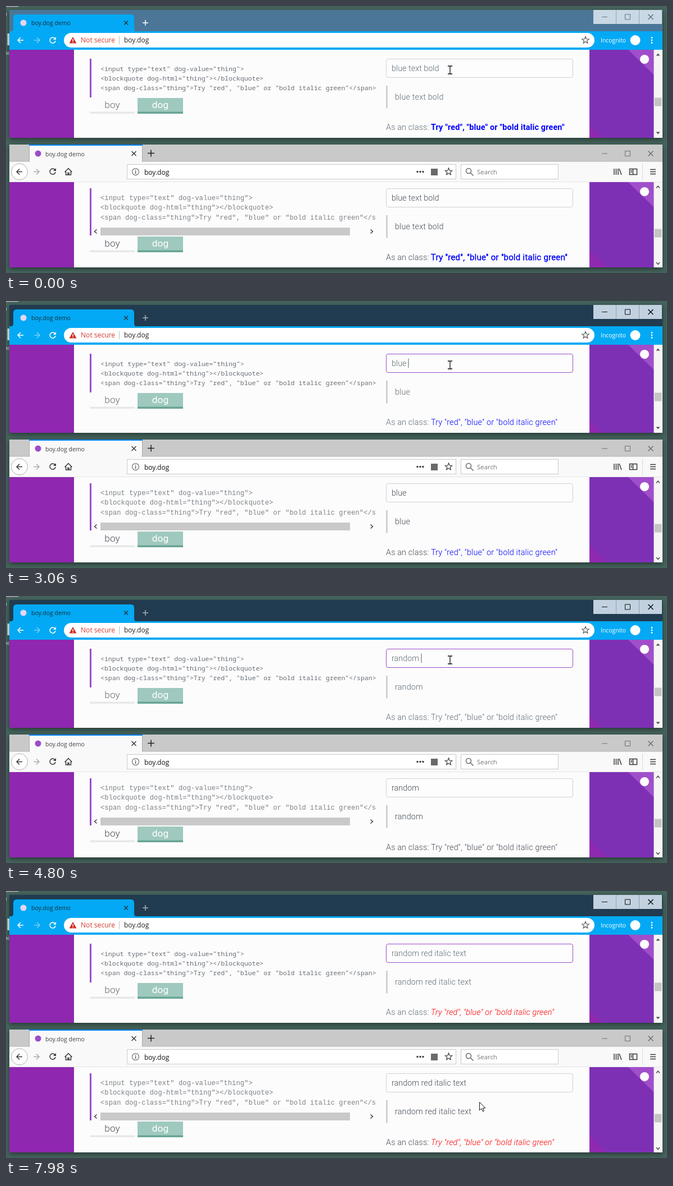
An HTML page for the animation above (8000 ms loop, 1176x476 px).

```html
<!DOCTYPE html>
<html lang="en">
<head>
<meta charset="utf-8">
<title>Two-window typing demo</title>
<style>
  html, body { margin: 0; width: 100%; height: 100%; overflow: hidden; background: #45645c; }
  svg { display: block; width: 1176px; height: 476px; }
  text { white-space: pre; }
  .ui { font-family: "Open Sans", "Noto Sans", sans-serif; }
  .body { font: 300 14.4px Roboto, sans-serif; fill: #606c76; }
  .spaced { letter-spacing: .144px; }
  .code { font: 11.52px "Noto Sans Mono", monospace; fill: #697077; }
  .tab { font: 300 17.3px Roboto, sans-serif; fill: #606c76; text-anchor: middle; }
  .ff .body, .ff .tab { fill: #454e57; }
  .ff .code { font: 12px "Liberation Mono", monospace; letter-spacing: .115px; fill: #7c8288; }
  .tab.on { fill: #fff; font-weight: 400; }
  .ff .tab.on { fill: #fff; }
  .red { fill: #f00 !important; }
  .blue { fill: #00f !important; }
  .green { fill: #080 !important; }
  .bold { font-weight: 700; }
  .ff .bold { font-weight: 300; stroke: currentColor; stroke: #00f; stroke-width: .75px; letter-spacing: .59px; }
  .italic { font-style: italic; }
  .line { fill: none; stroke-width: 1.5; }
  .frame { filter: drop-shadow(0 3px 4px rgba(0, 0, 0, .45)); }
  .chrome .field { stroke: #d1d1d1; }
  .chrome .field.focus { stroke: #9b4dca; }
</style>
</head>
<body>
<svg id="stage" viewBox="0 0 1176 476" xmlns="http://www.w3.org/2000/svg"></svg>
<script>
const LOOP = 8000;

// [time, input text]; the second window shows the entry before the current one
const keys = [
  [0, 'blue text bold'], [680, 'blue text bold'],
  [1820, 'blue text bol'], [1960, 'blue text bo'], [2090, 'blue text b'],
  [2230, 'blue text '], [2370, 'blue text '],
  [2640, 'blue tex'], [2780, 'blue t'], [2920, 'blue '], [3060, 'blue '],
  [3210, 'blue'], [3350, 'blu'], [3490, 'bl'], [3630, 'b'], [3750, ''], [3870, ''],
  [4140, 'r'], [4270, 'ra'], [4400, 'rand'], [4530, 'rando'], [4670, 'random'], [4800, 'random '],
  [5050, 'random r'], [5200, 'random re'], [5320, 'random red'], [5440, 'random red'],
  [5710, 'random red i'], [5860, 'random red it'], [6020, 'random red ita'],
  [6170, 'random red ital'], [6330, 'random red itali'], [6490, 'random red italic'],
  [6650, 'random red italic t'], [6770, 'random red italic te'], [6890, 'random red italic tex'],
  [7170, 'random red italic text'], [7300, 'random red italic text']
];

// [time, x, y, shape]
const moves = [
  [0, 790, 114, 'beam'], [7440, 794, 140, 'arrow'], [7570, 826, 300, 'arrow'],
  [7700, 877, 437, 'arrow'], [7850, 860, 405, 'arrow'], [7980, 842, 376, 'arrow']
];

const rect = (x, y, w, h, fill, more = '') =>
  `<rect x="${x}" y="${y}" width="${w}" height="${h}" fill="${fill}" ${more}/>`;
const path = (d, color, more = '') => `<path class="line" d="${d}" stroke="${color}" ${more}/>`;
const shape = (d, fill) => `<path d="${d}" fill="${fill}"/>`;
const dot = (x, y, r, fill) => `<circle cx="${x}" cy="${y}" r="${r}" fill="${fill}"/>`;
const escapeText = s => s.replace(/&/g, '&amp;').replace(/</g, '&lt;');
const label = (x, y, s, cls, more = '') =>
  `<text x="${x}" y="${y}" class="${cls}" ${more}>${escapeText(s)}</text>`;
const ui = (x, y, s, size, fill) => label(x, y, s, 'ui', `font-size="${size}" fill="${fill}"`);
const cross = (x, y, r, color) =>
  path(`M${x - r} ${y - r}l${2 * r} ${2 * r}m0 ${-2 * r}l${-2 * r} ${2 * r}`, color);
const plus = (x, y, r, color) => path(`M${x - r} ${y}h${2 * r}M${x} ${y - r}v${2 * r}`, color);
const arrow = (x, y, dir, color) =>
  path(`M${x - 5 * dir} ${y}h${10 * dir}m${-5 * dir} -5l${5 * dir} 5l${-5 * dir} 5`, color, 'stroke-width="2"');
const reload = (x, y, color) =>
  path(`M${x + 4} ${y - 3}a5 5 0 1 0 1 4`, color) + shape(`M${x + 6} ${y - 6}v5h-5z`, color);
const captions = (y, color) =>
  path(`M1060 ${y}h10M1101.5 ${y - 4.5}h9v9h-9z`, color, 'style="stroke-width:1"') + cross(1147, y, 4.5, color);

function star(x, y, color) {
  let d = '';
  for (let i = 0; i < 10; i++) {
    const r = i % 2 ? 2.8 : 6.5, a = i * Math.PI / 5;
    d += `${i ? 'L' : 'M'}${x + r * Math.sin(a)} ${y - r * Math.cos(a)}`;
  }
  return path(d + 'z', color, 'style="stroke-width:1.2"');
}

// Page body; each row of g holds the vertical places of one window
function page(id, g) {
  const { top, end, code, pre, tab, field, quote, note } = g;
  const lines = ['<input type="text" dog-value="thing">',
    '<blockquote dog-html="thing"></blockquote>',
    '<span dog-class="thing">Try "red", "blue" or "bold italic green"</span>'];
  return `<clipPath id="${id}Page"><rect x="6" y="${top}" width="1162" height="${end - top}"/></clipPath>
  <clipPath id="${id}Code"><rect x="149" y="${top}" width="${g.codeWidth}" height="100"/></clipPath>
  <g clip-path="url(#${id}Page)">` +
    rect(6, top, 115, end - top, '#8f27b0') +
    rect(121, top, 917, end - top, '#fcfcfc') +
    rect(1038, top, 115, end - top, '#7e30b5') +
    shape(`M1038 ${end - g.wedge}l${g.wedge} ${g.wedge}h-${g.wedge}z`, '#8f29b0') +
    shape(`M1107 ${top}h46v45z`, '#a04fcb') + dot(1136, top + 17, 8, '#fff') +
    rect(1152.5, top, 15.5, end - top, '#f5f5f5') +
    rect(1154, g.thumb, 12.5, 15, '#c4c4c4') + g.arrows +
    rect(149, pre, 3, g.preHeight, '#9b4dca') +
    `<g clip-path="url(#${id}Code)">` + lines.map((s, i) => label(168, code[i], s, 'code')).join('') + '</g>' +
    rect(149.5, tab + 24.5, 79.5, 3.5, '#e8e8e8') +
    rect(234, tab, 81, 25, '#9fc9be') + rect(234, tab + 24.5, 81, 3.5, '#69a596') +
    label(189, tab + 18, 'boy', 'tab') + label(274.5, tab + 18, 'dog', 'tab on') +
    `<rect id="${id}Field" class="field" x="676.5" y="${field + .5}" width="332" height="33" rx="3.5"
      fill="#fdfdfd" stroke="#d1d1d1"/>` +
    label(686, field + 21.5, '', 'body', `id="${id}Input"`) +
    `<rect id="${id}Bar" x="676" y="${quote}" width="3" height="40.5" fill="#d1d1d1"/>` +
    label(692, quote + 25, '', 'body spaced', `id="${id}Quote"`) +
    `<g id="${id}Below">` +
    label(676, note, 'As an class:', 'body spaced') +
    label(756, note, 'Try "red", "blue" or "bold italic green"', 'body spaced', `id="${id}Note"`) +
    label(522, note + 45, 'Getting started', 'body', 'style="font-size:17.3px"') + '</g></g>';
}

function topWindow() {
  const white = '#fff';
  return '<g class="chrome">' +
    rect(6, 7, 1162, 228, '#fcfcfc', 'class="frame"') +
    rect(6, 7, 1162, 39, '#4b7698', 'id="titleBar"') +
    shape('M7 46q6 0 6-6V21q0-6 6-6h203q6 0 6 6v19q0 6 6 6z', '#03a9f4') +
    rect(6, 45, 1162, 33, '#03a9f4') +
    dot(31, 30, 5.5, '#e6d5f1') + ui(45, 33.5, 'boy.dog demo', 10.5, '#12303f') +
    cross(213.5, 30, 3.5, '#20394a') +
    `<g id="newTab">${plus(248, 30, 5, white)}</g>` +
    `<g id="captions">${rect(1045, 7, 122, 25, '#c9d8e5')}` +
    path('M1085.5 7v25m41-25v25', '#91a7b8', 'style="stroke-width:1"') + '</g>' +
    `<g id="captionMarks">${captions(19.5, '#65737f')}</g>` +
    arrow(26, 61, -1, white) + `<g opacity=".45">${arrow(55, 61, 1, white)}</g>` + reload(83, 61, white) +
    rect(103, 48, 944, 26, white, 'rx="13"') +
    shape('M119 55l6.5 11.5h-13z', '#d02c22') + rect(118.3, 59, 1.5, 4, white) + rect(118.3, 64, 1.5, 1.3, white) +
    ui(133, 65.3, 'Not secure', 12.1, '#d33a30') + rect(201, 54, 1, 14, '#bbb') +
    ui(210, 65.3, 'boy.dog', 12, '#222') + star(1031, 61, '#555') +
    ui(1058, 64.7, 'Incognito', 10.4, white) + dot(1119.5, 61, 9, white) +
    [56.5, 61, 65.5].map(y => dot(1149, y, 1.4, white)).join('') +
    page('a', {
      top: 78, end: 235, code: [115.5, 132.5, 149.5], codeWidth: 515, pre: 94, preHeight: 69,
      tab: 164, field: 94, quote: 142, note: 221, wedge: 22, thumb: 163.5,
      arrows: shape('M1156.5 88.5l3.5-4 3.5 4z', '#505050') + shape('M1156.5 224.5l3.5 4 3.5-4z', '#505050')
    }) + rect(686, 102.5, 1, 16.5, '#59636c', 'id="caret"') + '</g>';
}

function lowerWindow() {
  const ink = '#3a3a3d', edge = '#cacacb';
  const chevron = (x, dir) => path(`M${x - 2 * dir} 398.5l${4 * dir} 3.5l${-4 * dir} 3.5`, '#404040');
  return '<g class="ff">' +
    rect(6, 247, 1162, 219, '#f9f9fa', 'class="frame"') +
    rect(6, 247, 1162, 30, '#c9c9c9') + rect(6, 276.5, 1162, 1, '#b4b4b4') +
    rect(41, 247, 202, 31, '#a9a9a9') + rect(42, 248, 200, 30, '#f9f9fa') + rect(41, 247, 202, 2, '#0a84ff') +
    dot(57, 263, 5.5, '#9b4dca') + ui(70, 267.5, 'boy.dog demo', 10.5, '#444') +
    cross(227.5, 263, 4, ink) + plus(258, 262.5, 6, '#222') + captions(263, '#707070') +
    `<circle cx="24" cy="295.5" r="14.5" fill="#fff" stroke="#b1b1b3"/>` + arrow(24, 295.5, -1, ink) +
    `<g opacity=".4">${arrow(54, 295.5, 1, ink)}</g>` + reload(83, 295, ink) +
    path('M104.5 296l6.5-6.5 6.5 6.5M106.5 295v6h9v-6M110 301v-3.5h2v3.5', ink) +
    rect(215.5, 282.5, 585, 26, '#fff', `stroke="${edge}"`) +
    path('M236.5 295.5a6 6 0 1 0-12 0a6 6 0 1 0 12 0', '#666', 'style="stroke-width:1.1"') +
    rect(229.8, 294.5, 1.5, 4.5, '#555') + rect(229.8, 291.8, 1.5, 1.5, '#555') +
    ui(246, 300.5, 'boy.dog', 12, '#111') +
    [732, 737, 742].map(x => dot(x, 295.5, 1.7, ink)).join('') +
    rect(756, 290, 12, 12, '#6a6a6d') + star(787.5, 295.5, ink) +
    rect(809.5, 282.5, 173, 26, '#fff', `stroke="${edge}"`) +
    path('M827.5 294a4.5 4.5 0 1 0-9 0a4.5 4.5 0 1 0 9 0M826.5 297.5l5 5', '#666') +
    ui(838, 300, 'Search', 11.4, '#777') +
    path('M1082 290v11m3.5-11v11m3.5-11v11m2-11l4 11', ink) +
    path('M1109.5 290.5h13v10h-13zM1115.5 290.5v10M1111.5 293.5h2.5m-2.5 2.5h2.5', ink) +
    rect(1132, 281, 1, 29, '#d7d7db') +
    path('M1146 291.5h10m-10 4h10m-10 4h10', ink) +
    rect(6, 313.5, 1162, 1, '#d2d2d3') +
    page('b', {
      top: 314, end: 466, code: [345.5, 362.5, 380.5], codeWidth: 509, pre: 325, preHeight: 84,
      tab: 411, field: 325, quote: 373, note: 453, wedge: 31, thumb: 397.5,
      arrows: path('M1157 324.5l3-3.5 3 3.5M1157 457l3 3.5 3-3.5', '#505050') +
        rect(168, 395, 444, 14, '#c9c9c9') + chevron(159.5, -1) + chevron(650.5, 1)
    }) + '</g>';
}

const desktop = shape('M0 0h22v1.5h-22z', '#b9a9bd') + rect(2.5, 49, 6, 21, '#e9eeec') +
  ui(-3, 86.5, 'no', 9.5, '#fff') + ui(-4, 17, 'n', 9.5, '#e3e3e3');
const pointers =
  '<g id="beam"><path class="line" d="M-4-7h3q1 0 1 1q0-1 1-1h3M0-7v14M-4 7h3q1 0 1-1q0 1 1 1h3" stroke="#111" style="stroke-width:1.3"/></g>' +
  '<path id="arrow" d="M.5.5v14.5l3.4-3.2 2.4 5.2 2.2-1-2.3-5h4.6z" fill="#fff" stroke="#111"/>';

document.getElementById('stage').innerHTML = desktop + topWindow() + lowerWindow() + pointers;
const el = id => document.getElementById(id);

function lastIndex(list, t) {
  let i = 0;
  while (i + 1 < list.length && list[i + 1][0] <= t) i++;
  return i;
}

function showText(id, text) {
  const solid = text.replace(/ /g, '\u00a0');
  if (el(id + 'Input').textContent !== solid) {
    el(id + 'Input').textContent = solid;
    el(id + 'Quote').textContent = solid;
  }
  el(id + 'Bar').setAttribute('height', text ? 40.5 : 18.5);
  el(id + 'Below').setAttribute('transform', `translate(0 ${text ? 0 : -22})`);
  const marks = text.split(' ').filter(w => /^(red|blue|green|bold|italic)$/.test(w));
  el(id + 'Note').setAttribute('class', ['body spaced', ...marks].join(' '));
}

function draw(t) {
  const k = lastIndex(keys, t);
  showText('a', keys[k][1]);
  showText('b', keys[Math.max(0, k - 1)][1]);

  const active = t >= 680, settled = t >= 830;
  el('titleBar').setAttribute('fill', settled ? '#213b50' : active ? '#365973' : '#4b7698');
  el('newTab').setAttribute('opacity', settled ? .6 : active ? .8 : 1);
  el('captions').setAttribute('opacity', settled ? .96 : 1);
  el('captionMarks').style.filter = active ? 'brightness(.15)' : 'none';
  el('aField').classList.toggle('focus', active);

  const caretOn = active && !(t >= 1260 && t < 1820) && t < 7700;
  el('caret').setAttribute('visibility', caretOn ? 'visible' : 'hidden');
  el('caret').setAttribute('x', Math.round(686 + el('aInput').getComputedTextLength()) - .5);

  const [, x, y, kind] = moves[lastIndex(moves, t)];
  for (const name of ['beam', 'arrow']) {
    el(name).setAttribute('visibility', name === kind ? 'visible' : 'hidden');
    el(name).setAttribute('transform', `translate(${x} ${y})`);
  }
}

const start = performance.now();
function tick() {
  draw((performance.now() - start) % LOOP);
  requestAnimationFrame(tick);
}
tick();
</script>
</body>
</html>
```
